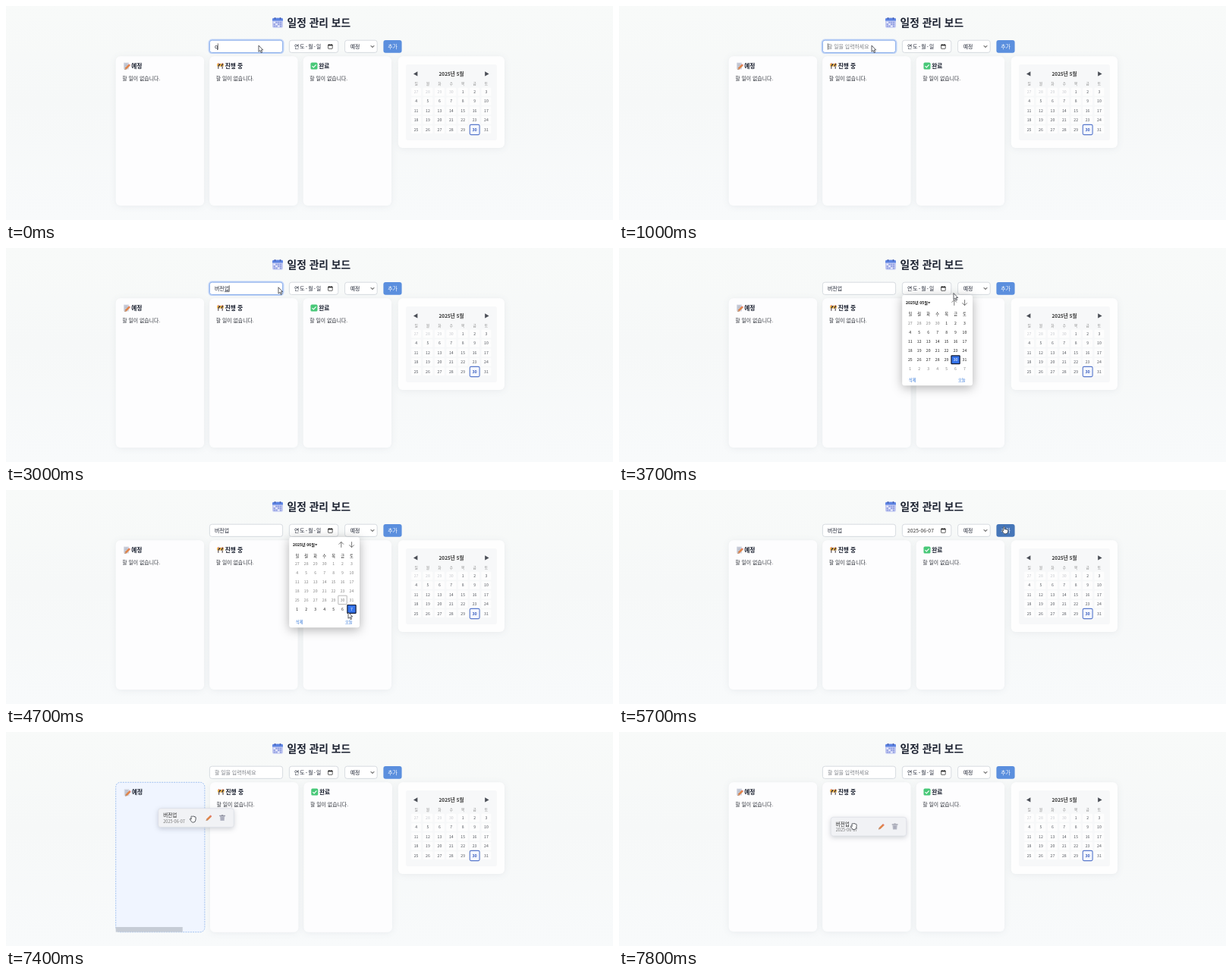
Animation, 800 px wide and 282 px high, one loop 8000 ms. Source, as an HTML page:

```html
<!DOCTYPE html>
<html lang="ko">
<head>
<meta charset="utf-8">
<title>일정 관리 보드</title>
<style>
html, body { margin: 0; width: 100%; height: 100%; overflow: hidden; }
svg { display: block; width: 800px; height: 282px; font-family: "Noto Sans CJK KR", "Noto Sans CJK", "Noto Sans CJK JP", sans-serif; }
.soft { filter: drop-shadow(0 1.5px 4px rgba(40, 60, 80, .07)); }
.lift { filter: drop-shadow(0 2px 3px rgba(30, 40, 60, .2)); }
.pop { filter: drop-shadow(0 3px 7px rgba(0, 0, 0, .3)); }
</style>
</head>
<body>
<svg id="stage" viewBox="0 0 800 282"></svg>
<script>
const LOOP = 8000, STEP = 100;
const INK = '#1b2130', DAYS = [...'일월화수목금토'];
const GRAB = [46, 14];

// Pointer path: time, x, y
const PATH = [
  [0, 333, 52], [2700, 333, 52], [2800, 336, 52], [2900, 336, 52], [3300, 428, 51],
  [3500, 428, 51], [3700, 441, 59.5], [4000, 453, 110], [4300, 453, 156], [4400, 451, 161],
  [4900, 451, 161], [5500, 509, 53], [5900, 509, 53], [6500, 378, 129], [6700, 372, 129],
  [6900, 372, 129], [7200, 199, 103], [7400, 246.5, 114.5], [7500, 273, 119],
  [7700, 325, 126], [7800, 309.5, 124], [8000, 309.5, 124]
];
// Typed text: time, value, composing
const TYPING = [
  [0, 'q'], [400, ''], [1200, 'ㅂ', 1], [1700, '버', 1], [1900, '벚', 1], [2000, '버전', 1],
  [2200, '버전ㅇ', 1], [2300, '버전어', 1], [2400, '버전업', 1], [3500, '버전업'], [5800, '']
];

const rect = (x, y, w, h, r, fill, more = '') =>
  `<rect x="${x}" y="${y}" width="${w}" height="${h}" rx="${r}" fill="${fill}" ${more}/>`;
const path = (d, fill, more = '') => `<path d="${d}" fill="${fill}" ${more}/>`;
const line = (d, color, w = .8) => path(d, 'none', `stroke="${color}" stroke-width="${w}"`);
const text = (x, y, s, size, fill = INK, more = '') =>
  `<text x="${x}" y="${y}" font-size="${size}" fill="${fill}" ${more}>${s}</text>`;
const at = (x, y, s, more = '') => `<g transform="translate(${x} ${y})" ${more}>${s}</g>`;
const MID = 'text-anchor="middle"', BOLD = 'font-weight="700"';
const border = (c, w = .8) => `stroke="${c}" stroke-width="${w}"`;

const pencil = path('M0 7.5L.8 5 5.4.4 7.3 2.2 2.6 6.8Z', '#e08348') +
  path('M0 7.5L.8 5 2.6 6.8Z', '#b59a86') + path('M5.4.4L6 0 7.7 1.6 7.3 2.2Z', '#d94f55');
const trash = rect(0, .6, 8, 1.2, .5, '#9698a6') + rect(2.8, 0, 2.4, 1, .4, '#9698a6') +
  path('M.8 2H7.2L6.6 8H1.4Z', '#b9bbc8') + line('M2.8 3V7M4 3V7M5.2 3V7', '#9193a3', .4);
const icons = [
  rect(.5, 0, 7, 9, .8, '#d5d8e2') + line('M1.7 2H6M1.7 4H6M1.7 6H4.5', '#8f98ac', .6) + at(1.8, 1.8, pencil),
  rect(.2, 1.4, 8.6, 3.6, .5, '#f3b544') + path('M1 5L3 1.4H4.8L2.8 5ZM5 5L7 1.4H8.6L6.8 5Z', '#3c3540') +
    rect(1.2, 5, 1.2, 3.2, 0, '#5c5358') + rect(6.6, 5, 1.2, 3.2, 0, '#5c5358') + rect(1.2, .3, 1.3, 1.3, .6, '#dd5347') + rect(6.5, .3, 1.3, 1.3, .6, '#dd5347'),
  rect(0, 0, 9, 9, 1.6, '#48c878') + path('M2 4.6L3.8 6.4 7.1 2.8', 'none', border('#fff', 1.2))
];

function calendarIcon() {
  let s = rect(0, .8, 14, 13, 2, '#c4cbf2') + path('M0 4.6V2.8Q0 .8 2 .8H12Q14 .8 14 2.8V4.6Z', '#5c83e2');
  for (let i = 0; i < 12; i++) s += rect(1.7 + i % 4 * 2.8, 5.8 + (i / 4 | 0) * 2.5, 2, 1.7, .3, i % 5 ? '#8e9bdf' : '#eef0fd');
  return s + rect(3, 0, 1.1, 2.4, .5, '#40549c') + rect(9.9, 0, 1.1, 2.4, .5, '#40549c');
}

function pointer(t) {
  const i = PATH.findIndex((p, k) => k && t <= p[0]);
  const [t0, x0, y0] = PATH[i - 1], [t1, x1, y1] = PATH[i];
  const k = (t - t0) / (t1 - t0);
  return [x0 + (x1 - x0) * k, y0 + (y1 - y0) * k];
}

function cursor(t, [x, y]) {
  const hand = t >= 7200, finger = t >= 5400 && t < 6000;
  const shape = hand
    ? 'M-4.2.2Q-3.3-.9-2.3.5L-2.6-2.9Q-1.9-4-1.1-2.8Q-.3-4.8.6-2.9Q1.6-4.5 2.2-2.5Q3.5-3.3 3.7-1.5L3.4 1.5Q3 4.5.8 4.5H-.8Q-2.5 4-4.2.2Z'
    : finger
      ? 'M-4.2.4Q-3.3-.6-2.3.8V-4.2Q-1.5-5.4-.8-4.2V-1.2Q.2-2 .8-1Q1.8-1.6 2.3-.6Q3.6-1 3.7.5V2Q3.2 4.8.8 4.8H-.8Q-2.5 4-4.2.4Z'
      : 'M0 0V8.3L1.9 6.5 3.2 9.6 4.6 9 3.3 6H5.7Z';
  return at(x, y, path(shape, '#fff', border('#30343c', .8) + ' stroke-linejoin="round"'));
}

function toolbar(t) {
  const [, value, composing] = TYPING.filter(k => k[0] <= t).pop();
  const focus = t < 3500, hover = t >= 5400 && t < 6000;
  let s = '';
  if (focus) s += rect(267.3, 44.3, 98.4, 18, 4, 'none', border('#c3d6f8', 1.6));
  s += rect(268.4, 45.2, 96.2, 16.2, 3, '#fff', border(focus ? '#6e9be8' : '#cfd4da'));
  s += value ? text(275, 56, value, 6.88)
    : text(275, 56, '할 일을 입력하세요', 6.88, '#7d8087');
  const end = 275 + [...value].reduce((w, c) => w + (c == 'q' ? 4 : 6.33), 0);
  if (composing) s += line(`M${end - 6} 57.6H${end}`, INK, .6);
  if (focus) s += line(`M${end + .3} 49.3V57.6`, '#111', .6);

  s += rect(373.4, 45.2, 64.4, 16.2, 3, '#fff', border('#cfd4da'));
  s += t >= 5000 && t < 5800 ? text(380, 56, '2025-06-07', 6.8, '#333')
    : text(380, 56, '연도-월-일', 6.8, INK, 'letter-spacing="1.1"');
  s += rect(424.6, 51, 5.6, 5.3, .4, 'none', border('#222', .7)) + line('M424.5 51.7H430.4', '#222', 1.3) +
    line('M425.8 50V51M429 50V51', '#222', .7);

  s += rect(446.6, 45.2, 42.6, 16.2, 3, '#fff', border('#cfd4da')) + text(453.7, 56, '예정', 6.88) +
    line('M480.8 52.2L483 54.5 485.2 52.2', '#222', 1);
  return s + rect(497.4, 45, 24.2, 16.8, 3, hover ? '#4676b8' : '#5b8fde') +
    text(509.5, 56, '추가', 6.88, '#fff', MID + ' font-weight="500"');
}

function columns(t, over, cardRight) {
  const grow = over < 0 ? 0 : .8;
  return ['예정', '진행 중', '완료'].map((name, i) => {
    const on = i == over, x = 144.7 + 123.5 * i + (over >= 0 && i > over ? grow : 0);
    const d = on ? .7 : 0;
    const empty = i == 0 ? t < 5800 || t >= 7800 : i == 1 ? t < 7800 : true;
    let s = rect(x, 66.3, 116.4 + (on ? grow : 0), 196.6 + grow, 6, on ? '#f0f5ff' : '#fdfdfe',
      on ? border('#8fb5ee') + ' stroke-dasharray="2 1.2"' : 'class="soft"');
    if (i == 0 && over >= 0 && cardRight > 262)
      s += rect(x, 257, 117 * 117 / (cardRight - 145), 6.6, 0, '#c6ccd6');
    s += at(x + 9.8 + d, 74.6 + d, icons[i]) + text(x + 20.5 + d, 81.7 + d, name, 7.74, INK, BOLD);
    if (empty) s += text(x + 8.5 + d, 97.5 + d, '할 일이 없습니다.', 6.88, '#30343c');
    return s;
  }).join('');
}

function monthCard() {
  let s = rect(516.8, 66.3, 140.2, 120.6, 6, '#fefefe', 'class="soft"') + rect(527, 77, 120, 100, 3, '#f7f8f9');
  s += path('M537 89.4L542.4 86.3V92.5Z', '#4a4e56') + path('M636.6 89.4L631.2 86.3V92.5Z', '#4a4e56');
  s += text(587, 92, '2025년 5월', 6.5, '#333', MID + ' ' + BOLD);
  DAYS.forEach((d, i) => s += text(540.6 + 15.4 * i, 104, d, 4.7, '#888', MID));
  for (let i = 0; i < 35; i++) {
    const x = 540.6 + 15.4 * (i % 7), y = 113 + 12.4 * (i / 7 | 0);
    const day = new Date(2025, 3, 27 + i).getDate();
    if (i == 33) s += rect(x - 6.3, y - 6.2, 12.8, 13.2, 1.6, '#f4f7ff', border('#5878cc', 1.1)) +
      text(x, y + 2.5, day, 5.4, '#3459bb', MID + ' ' + BOLD);
    else s += rect(x - 6.4, y - 5.2, 12.8, 10.6, 1.2, '#fdfdfd') + text(x, y + 1.9, day, 5.2, i < 4 ? '#c9cbd0' : '#555960', MID);
  }
  return s;
}

function picker(t) {
  const june = t >= 4700, scroll = !june ? 0 : t < 4800 ? 2.4 : 60;
  let s = rect(373.2, 62, 92.8, 119.2, 3, '#fff', 'class="pop"');
  s += text(378, 73.8, `2025년 0${june ? 6 : 5}월`, 5.1, '#111', BOLD) + path('M407 71.2H410.4L408.7 73.2Z', '#222');
  s += line('M441.8 75.8V68.4M438.6 71.6L441.8 68.4 445 71.6M455.6 68.2V75.6M452.4 72.4L455.6 75.6 458.8 72.4', '#555', .8);
  DAYS.forEach((d, i) => s += text(383.8 + 11.95 * i, 89, d, 5.2, '#222', MID));
  let grid = '';
  for (let i = 0; i < 77; i++) {
    const x = 383.8 + 11.95 * (i % 7), y = 99.3 + 12 * (i / 7 | 0) - scroll;
    const date = new Date(2025, 3, 27 + i), picked = i == (june ? 41 : 33);
    if (picked) grid += rect(x - 5.6, y - 5.4, 11.2, 10.8, .6, '#3573ea', border('#111a33', 1.2));
    else if (i == 33) grid += rect(x - 5.7, y - 5.7, 11.4, 11.4, .4, 'none', border('#999', .7));
    else if (i == 41 && t >= 4300) grid += rect(x - 5.8, y - 5.8, 11.6, 11.6, .6, '#eceff3');
    const color = picked ? '#fff' : date.getMonth() == (june ? 5 : 4) ? '#222' : '#858585';
    grid += text(x, y + 1.9, date.getDate(), 5.2, color, MID);
  }
  return s + `<g clip-path="url(#grid)">${grid}</g>` +
    text(382, 175.6, '삭제', 5.3, '#2f74d8') + text(447, 175.6, '오늘', 5.3, '#2f74d8');
}

const card = (x, y, lifted) => at(x, y,
  rect(.3, .3, 99.4, 24.6, 3, '#f1f2f5', border('#dcdfe5', .7) + (lifted ? ' class="lift"' : '')) +
  text(6.7, 11.7, '버전업', 6.5, '#222', 'font-weight="500"') + text(6.7, 19, '2025-06-07', 5.6, '#777') +
  at(63, 9, pencil) + at(80.6, 8.6, trash));

function scene(t) {
  const mouse = pointer(t), held = t >= 7200;
  const [hx, hy] = held ? pointer(Math.min(t, 7700)) : [];
  const spot = held ? [hx - GRAB[0], hy - GRAB[1]] : [153, 89];
  const over = t < 7200 || t >= 7800 ? -1 : t < 7500 ? 0 : 1;
  return `<defs><linearGradient id="bg" x2="0" y2="1"><stop stop-color="#f8faf9"/><stop offset=".45" stop-color="#f6f8f8"/><stop offset="1" stop-color="#f8fafb"/></linearGradient>
    <clipPath id="grid"><rect x="374" y="92.5" width="91" height="73.5"/></clipPath></defs>` +
    rect(0, 0, 800, 282, 0, 'url(#bg)') + at(351, 15, calendarIcon()) +
    text(370.5, 26.6, '일정 관리 보드', 13.76, INK, BOLD) +
    toolbar(t) + columns(t, over, spot[0] + 100) + monthCard() +
    (t >= 5800 ? card(...spot, held) : '') +
    (t >= 3500 && t < 5000 ? picker(t) : '') + cursor(t, mouse);
}

const stage = document.getElementById('stage');
let shown = -1;
function tick() {
  const t = Math.floor(performance.now() % LOOP / STEP) * STEP;
  if (t != shown) stage.innerHTML = scene(shown = t);
  requestAnimationFrame(tick);
}
tick();
</script>
</body>
</html>
```
